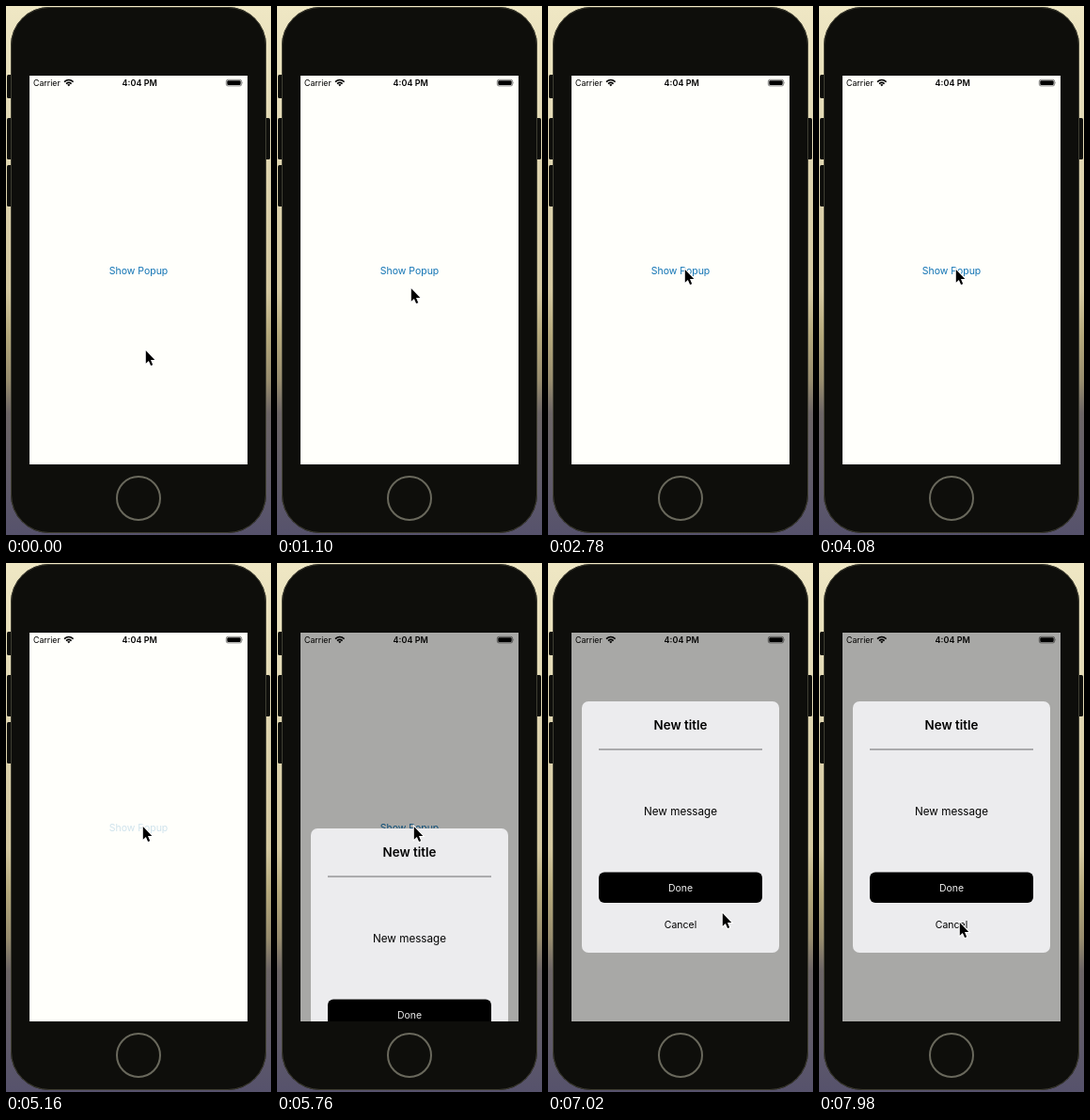
An HTML page for the animation above (8000 ms loop, 282 by 562 pixels).

```html
<!DOCTYPE html>
<html lang="en">
<head>
<meta charset="utf-8">
<title>Popup demo</title>
<style>
  html, body { margin: 0; width: 100%; height: 100%; overflow: hidden; background: #d9d0ac; }
  svg { display: block; width: 100vw; height: 100vh; }
  text { font-family: Inter, Roboto, sans-serif; font-size: 10.5px; fill: #000; }
  .mid { text-anchor: middle; }

  .link, .dim, .popup, .cursor { animation: 8s linear infinite; }
  .link { fill: #1274b4; animation-name: press; }
  .dim { animation-name: dim; }
  .popup { animation-name: rise; }
  .cursor { animation-name: point; }

  @keyframes press {
    0%, 62% { opacity: 1; }
    63%, 65.2% { opacity: .2; }
    70%, 100% { opacity: 1; }
  }
  @keyframes dim {
    0%, 65.5% { opacity: 0; }
    69.5%, 100% { opacity: .34; }
  }
  @keyframes rise {
    0%, 69% { transform: translateY(340px); animation-timing-function: ease-in; }
    72% { transform: translateY(136px); animation-timing-function: ease-out; }
    75%, 100% { transform: translateY(0); }
  }
  @keyframes point {
    0% { transform: translate(148px, 365px); animation-timing-function: ease-in-out; }
    13.75% { transform: translate(142px, 299px); animation-timing-function: ease-out; }
    22%, 76% { transform: translate(145px, 279px); animation-timing-function: ease-in-out; }
    87%, 89% { transform: translate(185px, 371px); animation-timing-function: ease-in-out; }
    98%, 100% { transform: translate(149px, 381px); }
  }
</style>
</head>
<body>
<svg viewBox="0 0 282 562" preserveAspectRatio="none">
  <defs>
    <linearGradient id="sky" x1="0" y1="0" x2="0" y2="1">
      <stop offset="0" stop-color="#efe7c4"/>
      <stop offset=".2" stop-color="#e3dab6"/>
      <stop offset=".54" stop-color="#d3c79f"/>
      <stop offset=".62" stop-color="#b5a97c"/>
      <stop offset=".71" stop-color="#978c6e"/>
      <stop offset=".77" stop-color="#6c6566"/>
      <stop offset="1" stop-color="#56526c"/>
    </linearGradient>
    <clipPath id="screen"><rect x="25" y="74" width="232" height="413"/></clipPath>
  </defs>

  <rect width="282" height="562" fill="url(#sky)"/>

  <g fill="#0e0e0b">
    <rect x="1" y="73" width="6" height="25" rx="1.5"/>
    <rect x="1" y="119" width="6" height="44" rx="1.5"/>
    <rect x="1" y="169" width="6" height="44" rx="1.5"/>
    <rect x="275" y="119" width="6" height="44" rx="1.5"/>
    <rect x="5" y="1" width="272" height="559" rx="41"/>
  </g>
  <g fill="none">
    <rect x="5.5" y="1.5" width="271" height="558" rx="40.5" stroke="#3f3e32"/>
    <circle cx="141" cy="523" r="23" stroke="#69685c" stroke-width="2"/>
  </g>

  <g clip-path="url(#screen)">
    <rect x="25" y="74" width="232" height="413" fill="#fffffb"/>

    <text x="29" y="84.7" style="font-size:8.8px">Carrier</text>
    <g fill="none" stroke="#000" stroke-width="1.6">
      <path d="M62 80.6Q66.8 76.4 71.6 80.6M64 82.7Q66.8 80.2 69.6 82.7"/>
      <path d="M65.2 83.7Q66.8 82.4 68.4 83.7L66.8 85.3Z" fill="#000" stroke="none"/>
    </g>
    <text class="mid" x="142.2" y="84.7" style="font-size:9px;font-weight:600">4:04 PM</text>
    <rect x="234.3" y="78.3" width="16.4" height="6.6" rx="1.8" fill="none" stroke="#555" stroke-width=".7"/>
    <rect x="235.3" y="79.2" width="14.4" height="4.8" rx="1"/>
    <path d="M251.6 80.5q1 1.1 0 2.2z" fill="#555"/>

    <text class="mid link" x="141" y="284.5">Show Popup</text>
    <rect class="dim" x="25" y="74" width="232" height="413"/>

    <g class="popup">
      <rect x="36" y="147" width="210" height="267" rx="7" fill="#ececee"/>
      <text class="mid" x="141" y="177.3" style="font-size:13.4px;font-weight:600">New title</text>
      <rect x="54" y="197.4" width="174" height="1.3" fill="#89898a"/>
      <text class="mid" x="141" y="267.7" style="font-size:11.7px">New message</text>
      <rect x="54" y="328.5" width="174" height="32.5" rx="6"/>
      <text class="mid" x="141" y="348.8" style="fill:#f0f0f0">Done</text>
      <text class="mid" x="141" y="387.5">Cancel</text>
    </g>
  </g>

  <path class="cursor" d="M.8 1V14.8L3.9 11.9L6.1 17.1L8.2 16.2L6 11.1H10.3Z"
        stroke="#fff" stroke-width="2" paint-order="stroke"/>
</svg>
</body>
</html>
```
